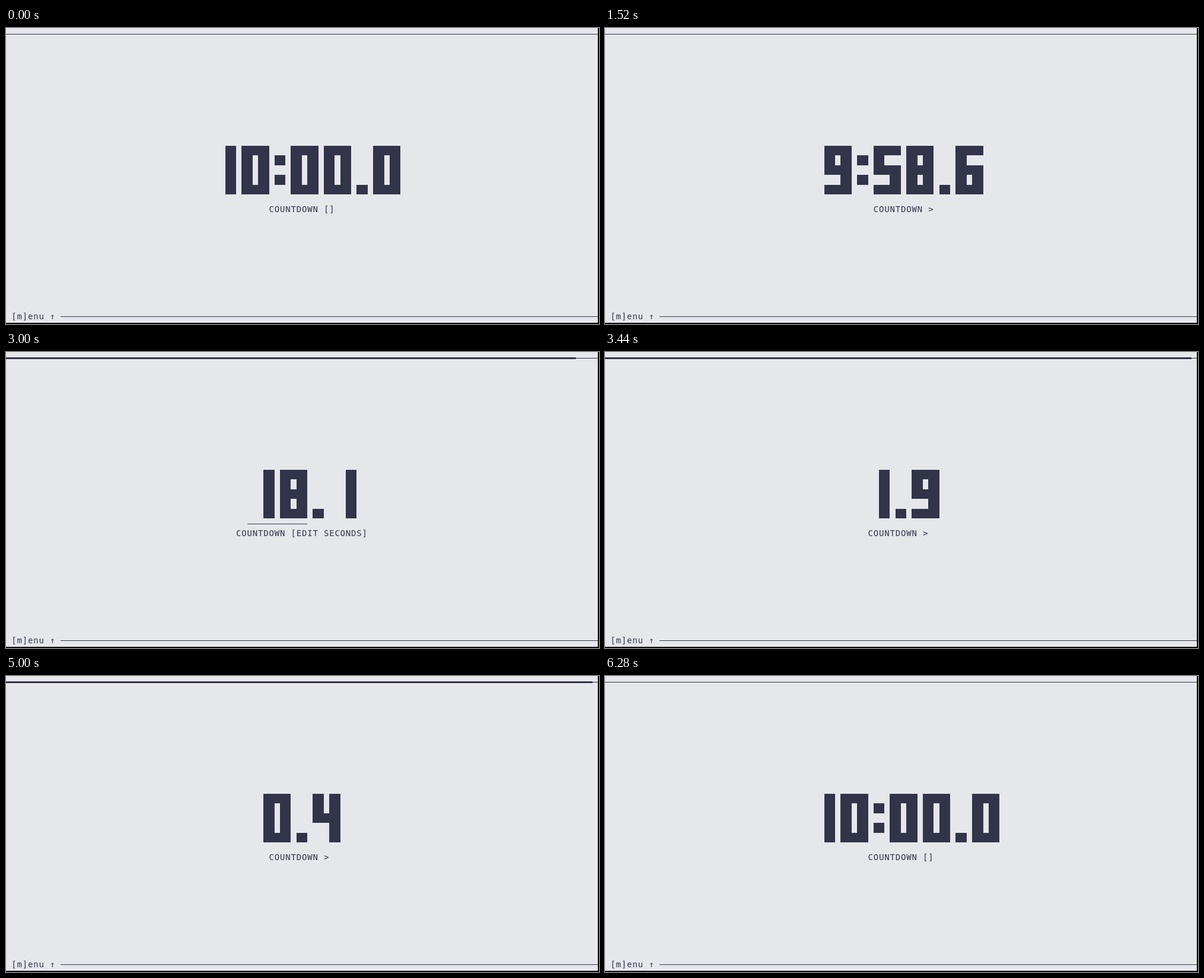
An HTML page with a canvas for the animation above (6.56 s loop, 1000x500 px).

```html
<!DOCTYPE html>
<html lang="en">
<head>
<meta charset="utf-8">
<title>Countdown</title>
<style>
html, body { margin: 0; height: 100%; overflow: hidden; background: #e6e7eb; }
canvas { display: block; }
</style>
</head>
<body>
<canvas width="1000" height="500"></canvas>
<script>
const ctx = document.querySelector('canvas').getContext('2d');
const LOOP = 6560, FRAME = 40, TOTAL = 6000;
const COLS = 108, CELL = 9.24, ROW = 16.45, TOP = 199;
const PAPER = '#e6e7eb', INK = '#32344a';

// Each letter is one row of a glyph: Full, Both sides, Left, Right
const GLYPHS = {
  0: 'FBBBF', 1: 'RRRRR', 2: 'FRFLF', 3: 'FRFRF', 4: 'BBFRR',
  5: 'FLFRF', 6: 'FLFBF', 7: 'FRRRR', 8: 'FBFBF', 9: 'FBFRF',
  ':': ' L L ', '.': '    L'
};
const SPANS = { F: [[0, 5]], B: [[0, 2], [3, 5]], L: [[0, 2]], R: [[3, 5]], ' ': [] };

// Timeline of states; times in ms, clock values in tenths of a second
const states = [];
const add = (time, tenths, label, edit = '') => states.push({ time, tenths, label, edit });

// One state per tick; gaps are counted in frames
function ticks(time, gaps, make) {
  ['0', ...gaps].forEach((gap, i) => {
    time += gap * FRAME;
    add(time, ...make(i));
  });
}

const run = from => i => [from - i, '>'];

add(0, TOTAL, '[]');
ticks(240, '23232323223232', run(5999));
add(1640, 5985, '||');
add(1960, 5985, '>');
ticks(2000, '322', run(5984));
add(2320, 5981, '[EDIT MINUTES]', 'minutes');
add(2480, 3581, '[EDIT MINUTES]', 'minutes');
add(2520, 1781, '[EDIT MINUTES]', 'minutes');
for (let i = 0; i <= 16; i++) {
  const presses = Math.min(55, Math.round(3.57 * i));
  add(2560 + i * FRAME, 571 - 10 * presses, '[EDIT SECONDS]', 'seconds');
}
add(3320, 21, '>');
ticks(3360, '2323232323223232322', run(20));
add(5320, 0, 'DONE +0.0');
ticks(5520, '2322322', i => [0, 'DONE +0.' + (i + 1)]);
add(6280, TOTAL, '[]');

const px = col => Math.round(col * CELL);
const glyphWidth = ch => (/\d/.test(ch) ? 5 : 2);
const numberWidth = text => [...text].reduce((sum, ch) => sum + glyphWidth(ch) + 1, -1);

function format(tenths) {
  const min = Math.floor(tenths / 600);
  const sec = Math.floor(tenths / 10) % 60;
  const head = min ? min + ':' + String(sec).padStart(2, '0') : String(sec);
  return head + '.' + tenths % 10;
}

function bar(from, to, y, h) {
  ctx.fillRect(px(from), y, px(to) - px(from), h);
}

function drawNumber(text, col) {
  for (const ch of text) {
    [...GLYPHS[ch]].forEach((code, row) => {
      const y = Math.round(TOP + row * ROW);
      const h = Math.round(TOP + (row + 1) * ROW) - y;
      for (const [a, b] of SPANS[code]) bar(col + a, col + b, y, h);
    });
    col += glyphWidth(ch) + 1;
  }
}

function draw({ tenths, label, edit }) {
  ctx.fillStyle = '#000';
  ctx.fillRect(0, 0, 1000, 500);
  ctx.fillStyle = PAPER;
  ctx.fillRect(0, 0, 998, 498);
  ctx.fillStyle = INK;

  bar(0, COLS, 10, 1);
  bar(0, Math.floor(COLS * (1 - tenths / TOTAL)), 9, 3);
  bar(10, COLS, 487, 1);

  const number = format(tenths);
  const caption = 'COUNTDOWN ' + label;
  const numWidth = numberWidth(number);
  const width = Math.max(numWidth, caption.length);
  const left = Math.round((COLS - width) / 2);
  const numLeft = Math.round(left + (width - numWidth) / 2);
  drawNumber(number, numLeft);
  if (edit) {
    const part = number.split(edit === 'minutes' ? ':' : '.')[0];
    bar(numLeft, numLeft + numberWidth(part), 290, 1);
  }

  ctx.font = '14px "DejaVu Sans Mono", monospace';
  ctx.letterSpacing = '0.81px';
  ctx.fillText(caption, (left + Math.floor((width - caption.length) / 2)) * CELL, 311);
  ctx.fillText('[m]enu ↑', CELL, 492);
}

const start = performance.now();
function frame() {
  const t = (performance.now() - start) % LOOP;
  draw(states.findLast(s => s.time <= t) || states[0]);
  requestAnimationFrame(frame);
}
frame();
</script>
</body>
</html>
```
